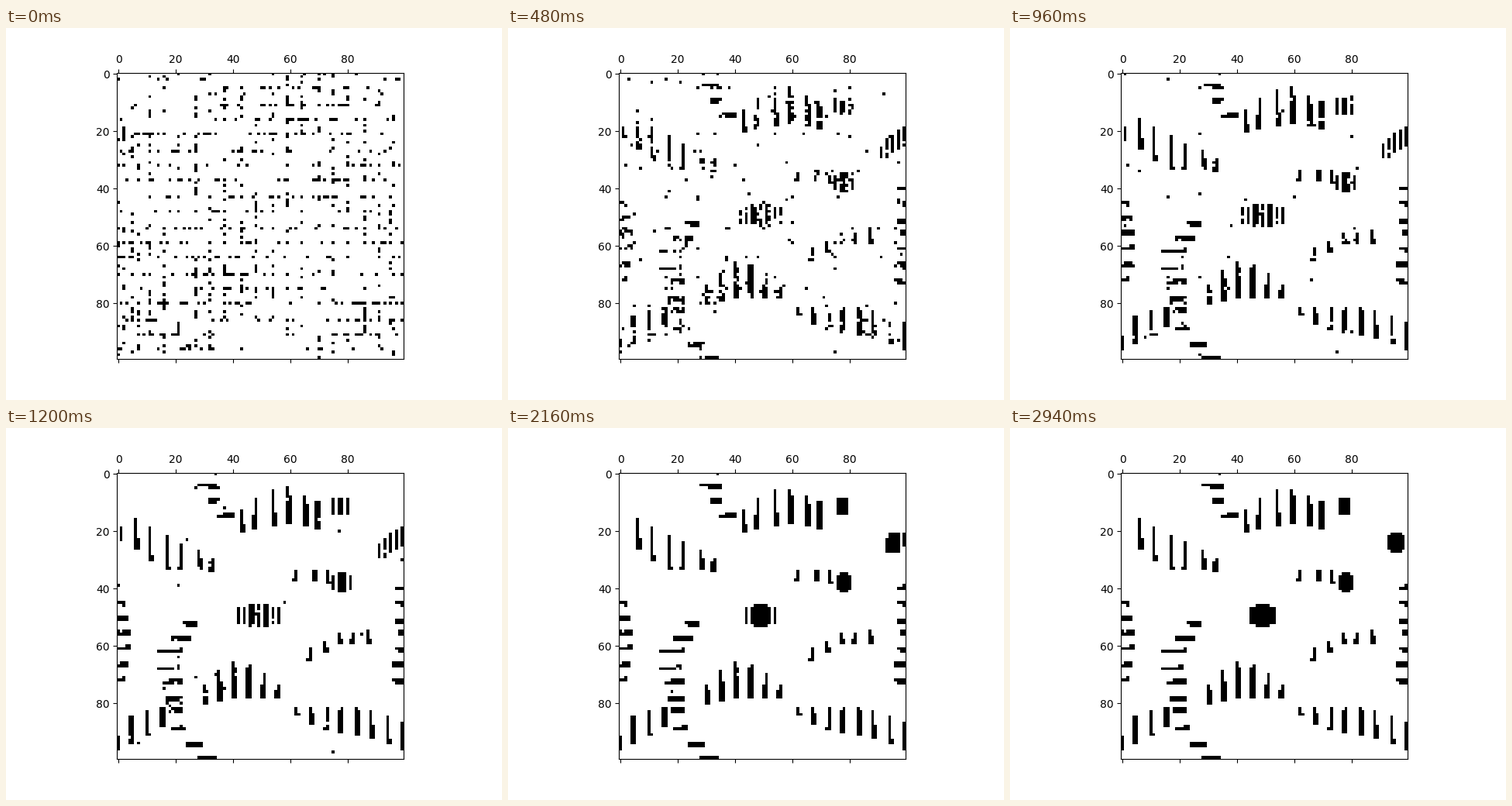
Write a matplotlib script that moves like this. It is 640x480 px and loops after 3000 ms.

```python
import numpy as np
import matplotlib.pyplot as plt
from matplotlib.animation import FuncAnimation

N, FRAMES, STEP_MS = 100, 50, 60
PITCH = 5.35
rng = np.random.default_rng(4)


def along(keys, count):
    """Spread a few key values evenly over a chain of bars."""
    return np.interp(np.linspace(0, 1, count),
                     np.linspace(0, 1, len(keys)), keys)


def chain(first, last, mids, lengths, upright=True):
    """Parallel bars about one pitch apart, each with a ragged second line."""
    count = round((last - first) / PITCH) + 1
    cells = []
    for at, mid, length in zip(np.linspace(first, last, count),
                               along(mids, count), along(lengths, count)):
        lo = round(mid - length / 2)
        hi = lo + round(length)
        cut = lo + rng.integers(0, hi - lo)
        side = rng.choice([-1, 1])
        cells += [(round(at), k) for k in range(lo, hi)]
        cells += [(round(at) + side, k) for k in range(cut, hi)]
    cells = np.array(cells, float)
    return cells if upright else cells[:, ::-1]


def blob(cx, cy, rx, ry, stretch, slope):
    """Rounded block, and the wider slanted shape it gathers from."""
    y, x = np.mgrid[:N, :N]
    inside = np.abs((x - cx) / rx) ** 3 + np.abs((y - cy) / ry) ** 3 <= 1
    end = np.argwhere(inside)[:, ::-1].astype(float)
    dx, dy = (end - (cx, cy)).T
    start = np.column_stack([cx + stretch * dx, cy + dy - slope * dx])
    return start, end


chains = [
    chain(6, 33, [22, 27.5, 29.5, 32.5], [11, 13, 9, 5]),
    chain(43, 70, [17, 13, 12, 15.5], [8, 13, 12, 10]),
    chain(62, 73, [35.5, 36.5], [4, 5]),
    chain(67, 87, [63.5, 58.5, 57.5], [5, 4, 5]),
    chain(30, 56, [78, 72, 73.5, 76.5], [7, 13, 12, 5]),
    chain(62, 99, [83, 87, 87.5, 92], [3, 9, 10, 10]),
    chain(5, 16, [90, 87.5, 86], [10, 9, 7]),
    chain(4, 15, [32, 34, 38], [8, 4, 6], upright=False),
    chain(45, 72, [1, 2, 1], [3, 5, 3], upright=False),
    chain(40, 72, [98.5, 99, 98], [3, 3, 4], upright=False),
    chain(52, 99, [25.5, 17.5, 20, 21, 31], [5, 9, 6, 5, 7], upright=False),
]
blobs = [
    blob(49, 49.5, 4.7, 3.8, 1.7, 0),
    blob(95.3, 24, 2.9, 3.6, 2, 1.2),
    blob(77.5, 11.5, 2.3, 3, 1.6, 0),
    blob(78, 38, 2.5, 3.4, 1.4, 0),
]
start = np.vstack(chains + [b[0] for b in blobs])
end = np.vstack(chains + [b[1] for b in blobs])
count = len(start)

# Cells drift onto a lattice first, then walk to their bar one by one.
scatter = start + rng.uniform(-11, 11, start.shape)
node = np.rint(scatter / PITCH) * PITCH
axis = rng.integers(0, 2, count)[:, None] == [0, 1]
scatter = np.where(axis, scatter, node)
node = node + axis * rng.integers(0, 2, (count, 1))
settle = np.maximum(rng.exponential(6, (count, 1)) - 1, 0.01)
leave = np.maximum(settle - 5, 0)


def ease(n, t0, t1):
    return np.clip((n - t0) / (t1 - t0), 0, 1)


def grid(n):
    home = start + (end - start) * ease(n, 20, 40)
    loose = scatter + (node - scatter) * ease(n, 0, 5)
    pos = loose + (home - loose) * ease(n, leave, settle)
    x, y = np.rint(pos).astype(int).T % N
    cells = np.zeros((N, N))
    cells[y, x] = 1
    return cells


fig, ax = plt.subplots(figsize=(6.4, 4.8), dpi=100)
image = ax.matshow(grid(0), cmap="binary", vmin=0, vmax=1)


def update(n):
    image.set_data(grid(n))
    return [image]


anim = FuncAnimation(fig, update, frames=FRAMES, interval=STEP_MS,
                     repeat=True, repeat_delay=0)
plt.show()
```
